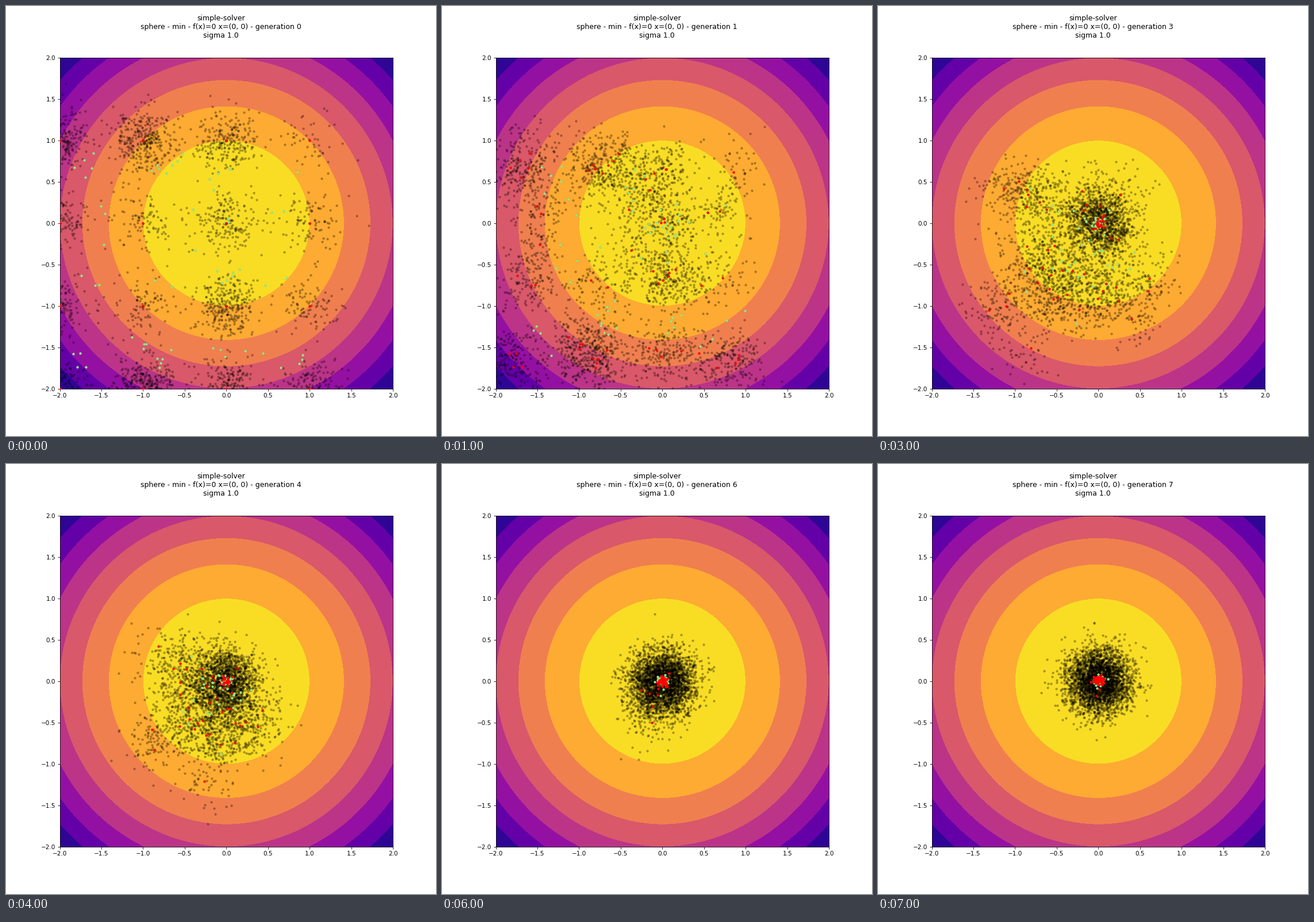
Write a matplotlib script that moves like this. It is 748 px wide and 748 px high and loops after 8000 ms.

```python
import matplotlib.pyplot as plt
import numpy as np
from matplotlib.animation import FuncAnimation

SIZE, DPI = 748, 74.8
GENERATIONS = 8
CHILDREN, SPREAD = 50, 0.19

# Starting parents on each whole-number point, rows y = 1..-2, columns x = -2..1.
START = [[5, 7, 5, 1],
         [3, 2, 4, 2],
         [3, 2, 6, 2],
         [4, 9, 5, 4]]


def start_parents():
    x, y = np.meshgrid(np.arange(-2, 2), np.arange(1, -3, -1))
    points = np.column_stack([x.ravel(), y.ravel()])
    return np.repeat(points, np.ravel(START), axis=0)


def best(children):
    """Pick the child nearest to the optimum from each family."""
    nearest = (children**2).sum(axis=2).argmin(axis=1)
    return children[np.arange(len(children)), nearest]


def evolve(seed=11):
    rng = np.random.default_rng(seed)
    parents = start_parents()
    for _ in range(GENERATIONS):
        noise = rng.normal(0, SPREAD, (len(parents), CHILDREN, 2))
        children = parents[:, None] + noise
        chosen = best(children)
        yield children.reshape(-1, 2), chosen, parents
        parents = chosen


history = list(evolve())

fig, ax = plt.subplots(figsize=(SIZE / DPI, SIZE / DPI), dpi=DPI)
axis = np.linspace(-2, 2, 401)
x, y = np.meshgrid(axis, axis)
ax.contourf(x, y, x**2 + y**2, levels=np.arange(9), cmap="plasma_r")
ticks = np.arange(-2, 2.1, 0.5)
ax.set(xlim=(-2, 2), ylim=(-2, 2), xticks=ticks, yticks=ticks)
title = fig.suptitle("", fontsize=12)


def dots(color, alpha, zorder):
    return ax.scatter([], [], s=10, c=color, alpha=alpha, linewidths=1,
                      zorder=zorder)


# Children, the chosen ones among them, and their parents on top.
layers = [dots("black", 0.25, 2), dots("lightgreen", 1, 3), dots("red", 1, 4)]


def update(generation):
    for layer, points in zip(layers, history[generation]):
        layer.set_offsets(points)
    title.set_text("simple-solver\n"
                   f"sphere - min - f(x)=0 x=(0, 0) - generation {generation}\n"
                   "sigma 1.0")
    return [*layers, title]


anim = FuncAnimation(fig, update, frames=GENERATIONS, interval=1000,
                     repeat=True, repeat_delay=0)
plt.show()
```
